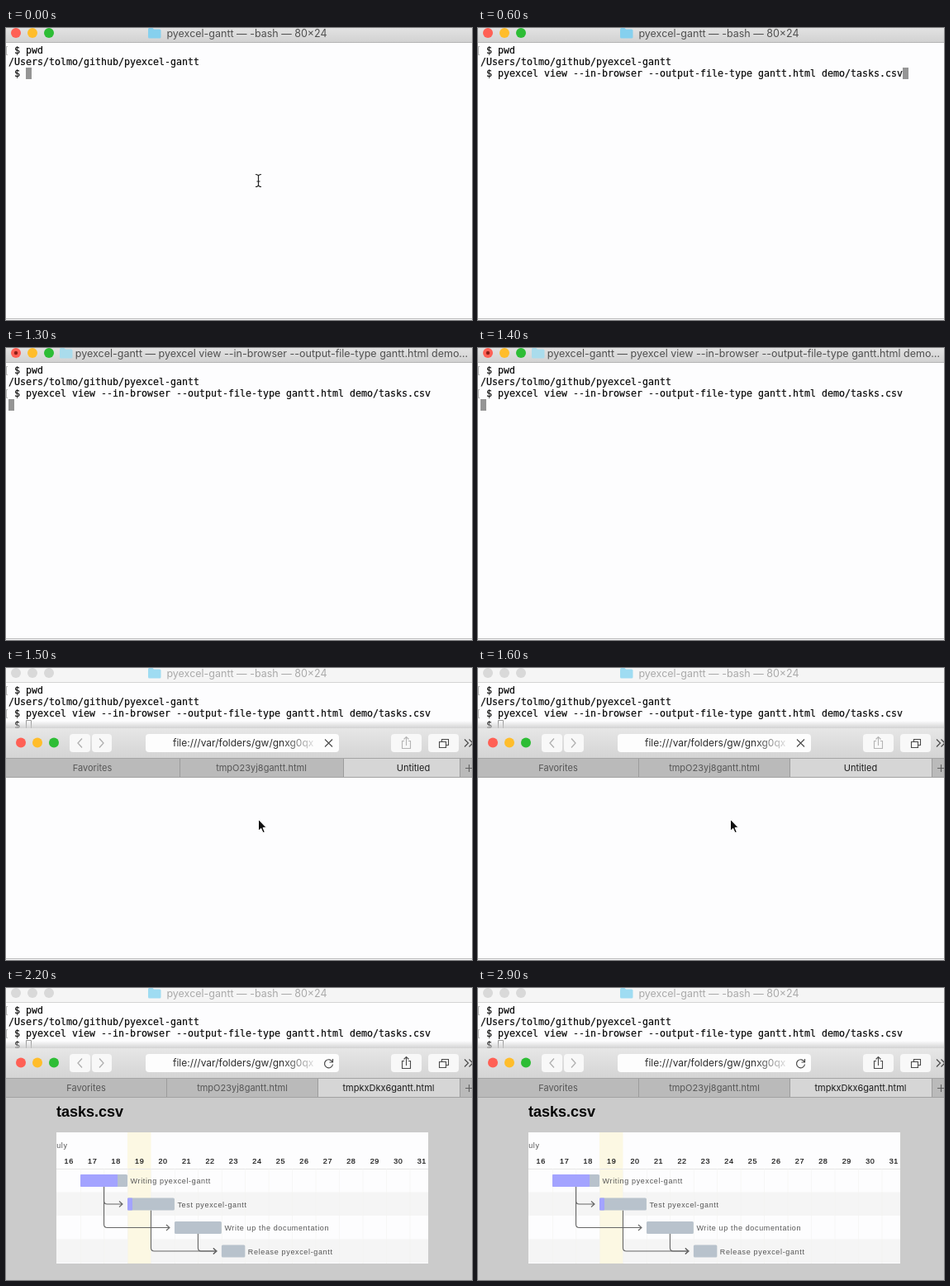
Animation, 564 px wide and 354 px high, one loop 3 s. Source, as an HTML page:

```html
<!DOCTYPE html>
<html lang="en">
<head>
<meta charset="utf-8">
<title>Terminal to Gantt chart</title>
<style>
  html, body { margin: 0; width: 100%; height: 100%; overflow: hidden; background: #fdfdfe; }
  svg { display: block; width: 564px; height: 354px; }
  text { white-space: pre; }
  .mono { font: 11.63px "DejaVu Sans Mono", monospace; fill: #080808; stroke: #080808; stroke-width: .2; }
  .title { font: 12.5px Inter, sans-serif; fill: #505050; }
  .tab { font: 11px Inter, sans-serif; fill: #565656; text-anchor: middle; }
  .tab.on { fill: #1c1c1c; }
  .url { font: 12px Inter, sans-serif; }
  .head { font: bold 18px "Liberation Sans", sans-serif; fill: #050505; }
  .chart { font: 9px "Liberation Sans", sans-serif; letter-spacing: .65px; fill: #555; }
  .date { fill: #111; text-anchor: middle; stroke: #111; stroke-width: .2; }
</style>
</head>
<body>
<svg id="stage" viewBox="0 0 564 354" xmlns="http://www.w3.org/2000/svg"></svg>
<script>
const LOOP = 3000;
const CMD = 'pyexcel view --in-browser --output-file-type gantt.html demo/tasks.csv';
const T = { type: 600, enter: 1000, browser: 1500, tabs: 1600, page: 1700, full: 1800, done: 1900, bar: 2100, pointer: 2200 };

const rect = (x, y, w, h, fill, rx = 0) =>
  `<rect x="${x}" y="${y}" width="${w}" height="${h}" fill="${fill}" rx="${rx}"/>`;
const text = (x, y, cls, s, extra = '') => `<text x="${x}" y="${y}" class="${cls}" ${extra}>${s}</text>`;
const path = (d, color = '#666', w = 1.1, fill = 'none') =>
  `<path d="${d}" fill="${fill}" stroke="${color}" stroke-width="${w}"/>`;
const during = (from, to, body) => `<g data-from="${from}" data-to="${to}">${body}</g>`;
const lights = (x, y, colors) =>
  colors.map((c, i) => `<circle cx="${x + i * 20}" cy="${y}" r="6" fill="${c}"/>`).join('');
const COLORS = ['#ff6055', '#ffbd2b', '#2dbd35'];

// Terminal
const row = (n, s) => text(3, 31 + n * 14, 'mono', s);
const mark = n => path(`M2 ${22.5 + n * 14}H.5v10H2`, '#b4b4b4', 1);
const caret = (col, n) => rect(3 + col * 7, 48 + (n - 2) * 14, 7, 14, '#959595');
const folder = (x, color) => path(`M${x} 1.5q0-1.5 1.5-1.5h4l1.5 1.5h7q1.5 0 1.5 1.5v8q0 1.5-1.5 1.5h-12.5q-1.5 0-1.5-1.5z`, 'none', 0, color);
const frame = (fill, edge) => rect(0, 0, 564, 17, fill) + rect(0, 17, 564, 1, edge);
const heading = (x, s, color = '#505050') => text(x, 11, 'title', s, `text-anchor="middle" style="fill:${color}"`);
const SHELL = 'pyexcel-gantt — -bash — 80×24';

function terminal() {
  const idle = folder(172, '#86d0ee') + heading(291.5, SHELL);
  const busy = '<circle cx="12" cy="6" r="2.2" fill="#8c1f18"/>' + folder(65, '#aadcec') +
    heading(321.5, 'pyexcel-gantt — pyexcel view --in-browser --output-file-type gantt.html demo…');
  const away = frame('#f5f5f5', '#d4d4d4') + lights(12, 6, Array(3).fill('#d9d9d9')) +
    folder(172, '#9fdcf2') + heading(291.5, SHELL, '#aaa');
  return rect(0, 0, 564, 354, '#fdfdfe') + frame('url(#bar)', '#b4b4b4') + lights(12, 6, COLORS) +
    during(0, T.enter, idle) + during(T.enter, T.browser, busy) + during(T.browser, LOOP, away) +
    mark(0) + row(0, ' $ pwd') + row(1, '/Users/tolmo/github/pyexcel-gantt') + row(2, ' $') +
    during(0, T.type, caret(3, 2) +
      path('M302 177.5q3.5 0 3.5 2.5v10q0 2.5-3.5 2.5M309 177.5q-3.5 0-3.5 2.5v10q0 2.5 3.5 2.5M303.5 186h4', '#222', 1.2)) +
    during(T.type, LOOP, row(2, '   ' + CMD)) +
    during(T.type, T.enter, caret(73, 2)) +
    during(T.enter, LOOP, mark(2)) +
    during(T.enter, T.browser, caret(0, 3)) +
    during(T.browser, LOOP, row(3, ' $') + path('M24.5 77V63.5h6V77', '#959595', 1)) +
    rect(0, 352, 564, 1, '#b8b8b8');
}

// Browser
const button = (x, w) => rect(x, 80, w, 22, '#f8f8f8', 4);

function tabBar(a, b, labels, centers) {
  return rect(0, 109, 564, 23, '#bababa') + rect(b, 109, 549 - b, 23, '#d6d6d6') +
    [a, b, 549].map(x => rect(x, 109, 1, 23, '#9c9c9c')).join('') +
    rect(0, 109, 564, 1, '#a4a4a4') + rect(0, 132, 564, 1, '#a2a2a2') +
    labels.map((s, i) => text(centers[i], 125, i === 2 ? 'tab on' : 'tab', s)).join('') +
    path('M556 121.5h9M560.5 117v9', '#606060');
}

function shareIcon(color) {
  return path('M482 88.5h-2.5v9h10v-9H487M484.5 94V83.5M481.5 86.5l3-3 3 3', color);
}

function toolbar() {
  const ink = '#4a4a4a', pale = '#b4b4b4';
  return rect(0, 64, 564, 9, 'url(#shade)') + rect(0, 73, 564, 36, 'url(#tool)') +
    lights(18, 90.5, COLORS) + button(77, 25) + button(104, 24) +
    path('M92 85.5l-5 5.5 5 5.5M113 85.5l5 5.5-5 5.5', '#b0b0b0', 1.3) +
    rect(169, 80, 234, 22, '#fdfdfd', 4) +
    text(202, 95, 'url', 'file:///var/folders/gw/gnxg0qx', 'fill="url(#fade)"') +
    button(466, 37) + button(511, 37) +
    path('M524.5 89.5h8v7h-8zM527.5 89V86.5h8v7H533', ink) +
    path('M555 86.5l4.5 4.5-4.5 4.5M560.5 86.5l4.5 4.5-4.5 4.5', ink, 1.2) +
    during(T.browser, T.done, path('M386 86.5l9 9M395 86.5l-9 9', ink) + shareIcon(pale)) +
    during(T.done, LOOP, path('M395 89.5a5 5 0 1 0 .5 3M391.5 90h4v-4', ink, 1.2) + shareIcon(ink)) +
    during(T.page, T.full, rect(169, 99.5, 91, 2, '#2a80e6')) +
    during(T.full, T.done, rect(169, 99.5, 234, 2, '#2a80e6'));
}

// Gantt chart
const DAY = 28.47, LEFT = 61.6, ROW = 28.5, TOP = 219;
const dayX = d => LEFT + (d - 16) * DAY;
const TASKS = [
  [17, 2, 'Writing pyexcel-gantt', 45],
  [19, 2, 'Test pyexcel-gantt', 6],
  [21, 2, 'Write up the documentation', 0],
  [23, 1, 'Release pyexcel-gantt', 0]
];

function link(from, to) {
  const x = dayX(TASKS[from][0] + 1), y = TOP + 22 + from * ROW;
  const endX = dayX(TASKS[to][0]) - 6, endY = TOP + 14.5 + to * ROW;
  return path(`M${x} ${y}V${endY - 4}q0 4 4 4H${endX}m-4-3.5l4 3.5-4 3.5`);
}

function gantt() {
  let s = rect(0, 133, 564, 221, '#cbcbcb') + text(61, 156, 'head', 'tasks.csv') +
    rect(61, 175, 450, 159, '#fdfdfe') +
    [1, 3].map(i => rect(61, TOP + i * ROW, 450, ROW, '#f5f5f5')).join('') +
    rect(dayX(19), 175, DAY, 159, '#fcf8e3') + rect(61, TOP, 450, 1, '#e6e6e6');
  for (let d = 17; d <= 31; d++) s += rect(dayX(d), TOP, .6, 115, '#f3f3f0');
  s += `<g clip-path="url(#chart)">${text(56, 194, 'chart', 'July')}</g>`;
  for (let d = 16; d <= 31; d++) s += text(dayX(d) + DAY / 2 + .4, 213, 'chart date', d);
  s += link(0, 1) + link(0, 2) + link(1, 3) + link(2, 3);
  TASKS.forEach(([day, span, name, part], i) => {
    const x = dayX(day), y = TOP + 7 + i * ROW, w = span * DAY;
    s += rect(x, y, w, 15, '#b8c2cc', 1.5) + rect(x, y, part, 15, '#a3a3ff', 1) +
      text(x + w + 3.5, y + 11, 'chart', name);
  });
  return s;
}

const arrow = path('M305.5 183.5v14l3.2-3 2.3 5.2 2.3-1-2.3-5h4.3z', '#fff', 1, '#111');
const files = ['Favorites', 'tmpO23yj8gantt.html'];

function gradient(id, y1, y2, a, b) {
  return `<linearGradient id="${id}" gradientUnits="userSpaceOnUse" x1="0" x2="0" y1="${y1}" y2="${y2}">
    <stop stop-color="${a}"/><stop offset="1" stop-color="${b}"/></linearGradient>`;
}

const stage = document.getElementById('stage');
stage.innerHTML = `<defs>
  ${gradient('bar', 0, 17, '#e2e2e2', '#d2d2d2')}
  ${gradient('tool', 73, 109, '#e6e6e6', '#d4d4d4')}
  ${gradient('shade', 64, 73, '#c8c8c800', '#c8c8c8cc')}
  <linearGradient id="fade" gradientUnits="userSpaceOnUse" x1="335" x2="374" y1="0" y2="0">
    <stop stop-color="#2c2c2c"/><stop offset="1" stop-color="#2c2c2c" stop-opacity=".1"/></linearGradient>
  <clipPath id="chart"><rect x="61" y="175" width="450" height="159"/></clipPath>
</defs>` + terminal() +
  during(T.browser, LOOP, toolbar() + rect(0, 132, 564, 220, '#fdfdfe')) +
  during(T.browser, T.tabs, tabBar(210, 408, [...files, 'Untitled'], [104.5, 309, 493])) +
  during(T.tabs, T.page, tabBar(194, 377, [...files, 'Untitled'], [97, 286, 463])) +
  during(T.page, LOOP, gantt() + tabBar(194, 377, [...files, 'tmpkxDkx6gantt.html'], [97, 286, 463])) +
  during(T.page, T.bar, rect(280, 345, 74, 6.5, '#6c6c6c', 3.25)) +
  during(T.browser, T.pointer, arrow);

// Each part is switched on and off by hard steps on one shared clock.
for (const el of stage.querySelectorAll('[data-from]')) {
  const from = +el.dataset.from, to = +el.dataset.to;
  const steps = [[from, 1]];
  if (from > 0) steps.unshift([0, 0]);
  if (to < LOOP) steps.push([to, 0]);
  steps.push([LOOP, to < LOOP ? 0 : 1]);
  const keys = steps.map(([t, opacity]) => ({ offset: t / LOOP, opacity, easing: 'step-end' }));
  el.animate(keys, { duration: LOOP, iterations: Infinity }).startTime = 0;
}
</script>
</body>
</html>
```
